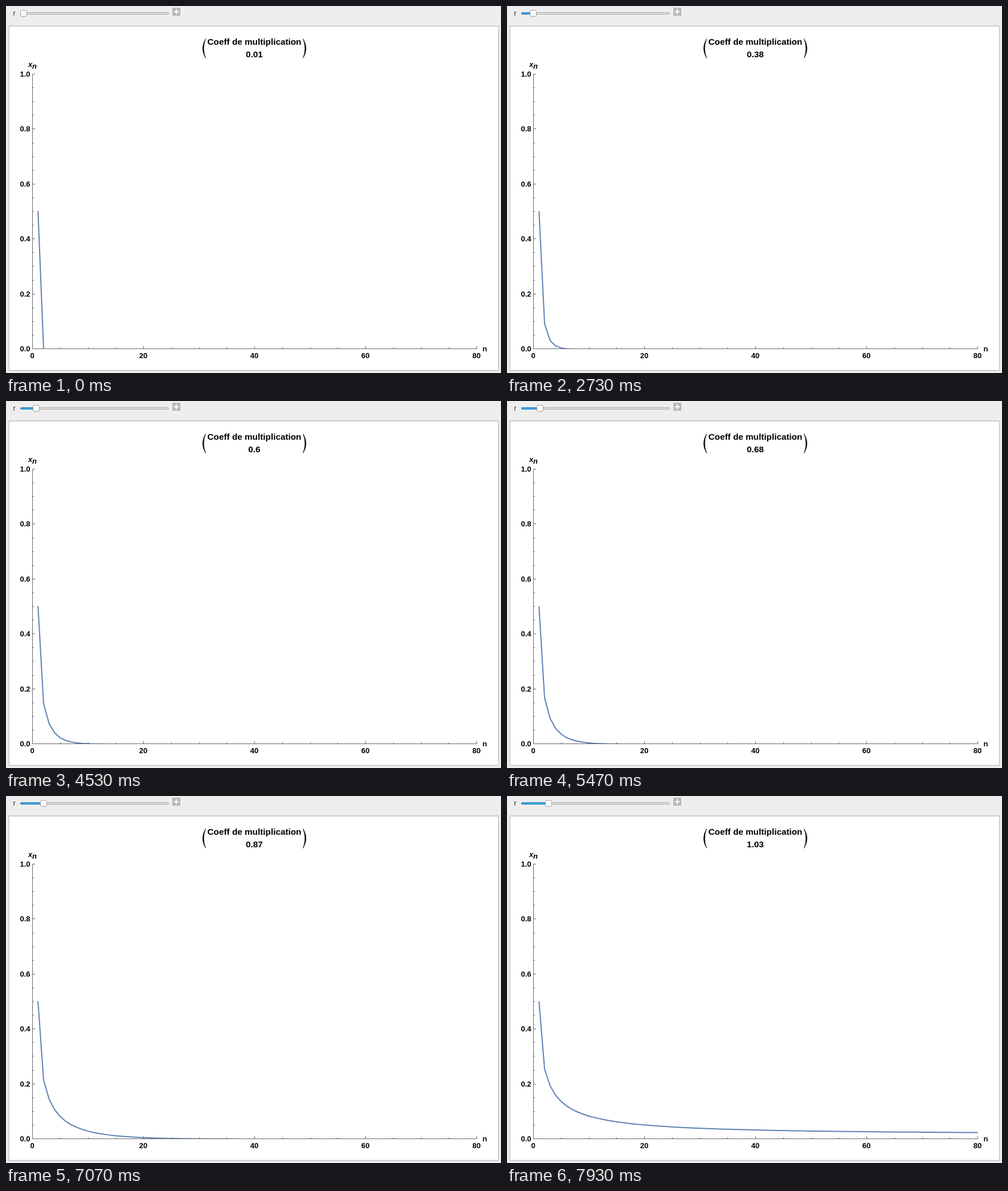
Animation of 869 by 644 pixels, one loop 8 s. Source, as an HTML page:

```html
<!DOCTYPE html>
<html lang="fr">
<head>
<meta charset="utf-8">
<title>Coeff de multiplication</title>
<style>
  html, body { margin: 0; width: 100%; height: 100%; overflow: hidden; background: #eee; }
  svg { display: block; width: 869px; height: 644px; }
  text { font: bold 13px "Liberation Sans", Arial, sans-serif; }
  .title { font-size: 15.3px; text-anchor: middle; }
  .axis { fill: none; stroke: #666; stroke-width: 1; }
</style>
</head>
<body>
<svg viewBox="0 0 869 644">
  <defs>
    <linearGradient id="knobFill" x2="0" y2="1">
      <stop stop-color="#fff"/><stop offset="1" stop-color="#f4f4f4"/>
    </linearGradient>
    <clipPath id="plotArea"><rect x="46" y="119" width="780.5" height="483"/></clipPath>
  </defs>
  <rect width="869" height="644" fill="#eee"/>

  <text x="12.5" y="17" style="font-weight:400;font-size:12px" fill="#222">r</text>
  <rect x="25.5" y="11.5" width="260" height="3" rx="1.5" fill="#dedede" stroke="#ababab"/>
  <rect id="fill" x="25.5" y="11.5" height="3" rx="1.5" fill="#3fa9e8" stroke="#2b7fb3"/>
  <rect id="knob" y="7.5" width="11" height="11" rx="2.5" fill="url(#knobFill)" stroke="#a2a2a2"/>
  <rect x="292" y="3" width="14" height="14" fill="#b7b7b7"/>
  <path d="M294.5 10h9M299 5.5v9" stroke="#fff" stroke-width="2"/>

  <rect x="5" y="35" width="859.5" height="604.5" rx="1" fill="#fff" stroke="#bfbfbf" stroke-width="1.3"/>
  <text class="title" x="436" y="68">Coeff de multiplication</text>
  <text class="title" x="436" y="90" id="value"></text>
  <path d="M350.5 57.5Q340 74.5 350.5 91.5Q343.8 74.5 350.5 57.5ZM521.5 57.5Q532 74.5 521.5 91.5Q528.2 74.5 521.5 57.5Z" stroke="#000" stroke-width=".6"/>

  <g font-style="italic">
    <text x="39" y="107" style="font-style:italic">x</text>
    <text x="46" y="110" style="font-style:italic">n</text>
  </g>
  <text x="836.5" y="606">n</text>
  <path id="curve" clip-path="url(#plotArea)" fill="none" stroke="#5e81b5" stroke-width="2" stroke-linecap="square"/>
  <path id="axes" class="axis"/>
  <g id="labels"></g>
</svg>
<script>
const LOOP = 8000;
const X0 = 46.5, Y0 = 601.5, DX = 9.75, H = 482;
const $ = id => document.getElementById(id);

// [time in ms, displayed coefficient, knob centre]
const steps = [
  [0, .01, 31], [1030, .04, 33], [1130, .07, 33],
  [1500, .13, 36], [1630, .15, 37], [1730, .18, 37],
  [1930, .21, 40], [2030, .24, 40],
  [2230, .27, 42], [2330, .29, 43], [2430, .32, 43],
  [2730, .38, 46], [2800, .39, 46], [3030, .4, 46], [3170, .43, 47],
  [3670, .47, 50], [3770, .5, 50],
  [4330, .54, 52], [4430, .57, 53], [4530, .6, 53],
  [4770, .63, 55], [4970, .64, 55],
  [5470, .68, 58], [5570, .7, 58], [5770, .71, 58],
  [5970, .74, 60], [6170, .75, 60], [6270, .76, 60],
  [6670, .81, 63], [6770, .83, 63],
  [7070, .87, 66], [7170, .91, 68], [7270, .95, 69],
  [7730, .98, 71], [7830, 1.01, 72], [7930, 1.03, 73]
];

function drawAxes() {
  let d = `M${X0} ${Y0 - H}V${Y0}H826.5`, labels = "";
  const label = (x, y, anchor, s) =>
    labels += `<text x="${x}" y="${y}" text-anchor="${anchor}">${s}</text>`;
  for (let i = 0; i <= 20; i++) {
    const major = i % 4 === 0, y = Math.round(Y0 - i * H / 20 - .5) + .5;
    d += `M${X0} ${y}h${major ? 4.5 : 2.5}`;
    if (major) label(42.5, y + 4.5, "end", (i / 20).toFixed(1));
  }
  for (let n = 0; n <= 80; n += 5) {
    const major = n % 20 === 0, x = Math.round(X0 + n * DX - .5) + .5;
    d += `M${x} ${Y0}v${major ? -4.5 : -2.5}`;
    if (major) label(x - .5, 618, "middle", n);
  }
  $("axes").setAttribute("d", d);
  $("labels").innerHTML = labels;
}

// logistic map x -> r x (1 - x), starting at 0.5
function curvePath(r) {
  const pts = [];
  for (let n = 1, x = .5; n <= 80; n++, x *= r * (1 - x))
    pts.push(`${(X0 + n * DX).toFixed(2)} ${(Y0 + .6 - H * x).toFixed(2)}`);
  return "M" + pts.join("L");
}

let shown;
function show(step) {
  if (step === shown) return;
  shown = step;
  const [, coeff, knob] = step;
  $("value").textContent = coeff;
  $("curve").setAttribute("d", curvePath(coeff - .01));
  $("knob").setAttribute("x", knob - 5.5);
  $("fill").setAttribute("width", knob - 25.5);
}

const start = performance.now();
function tick(now) {
  const t = Math.max(0, now - start) % LOOP;
  show(steps.findLast(s => s[0] <= t));
  requestAnimationFrame(tick);
}

drawAxes();
tick(start);
</script>
</body>
</html>
```
